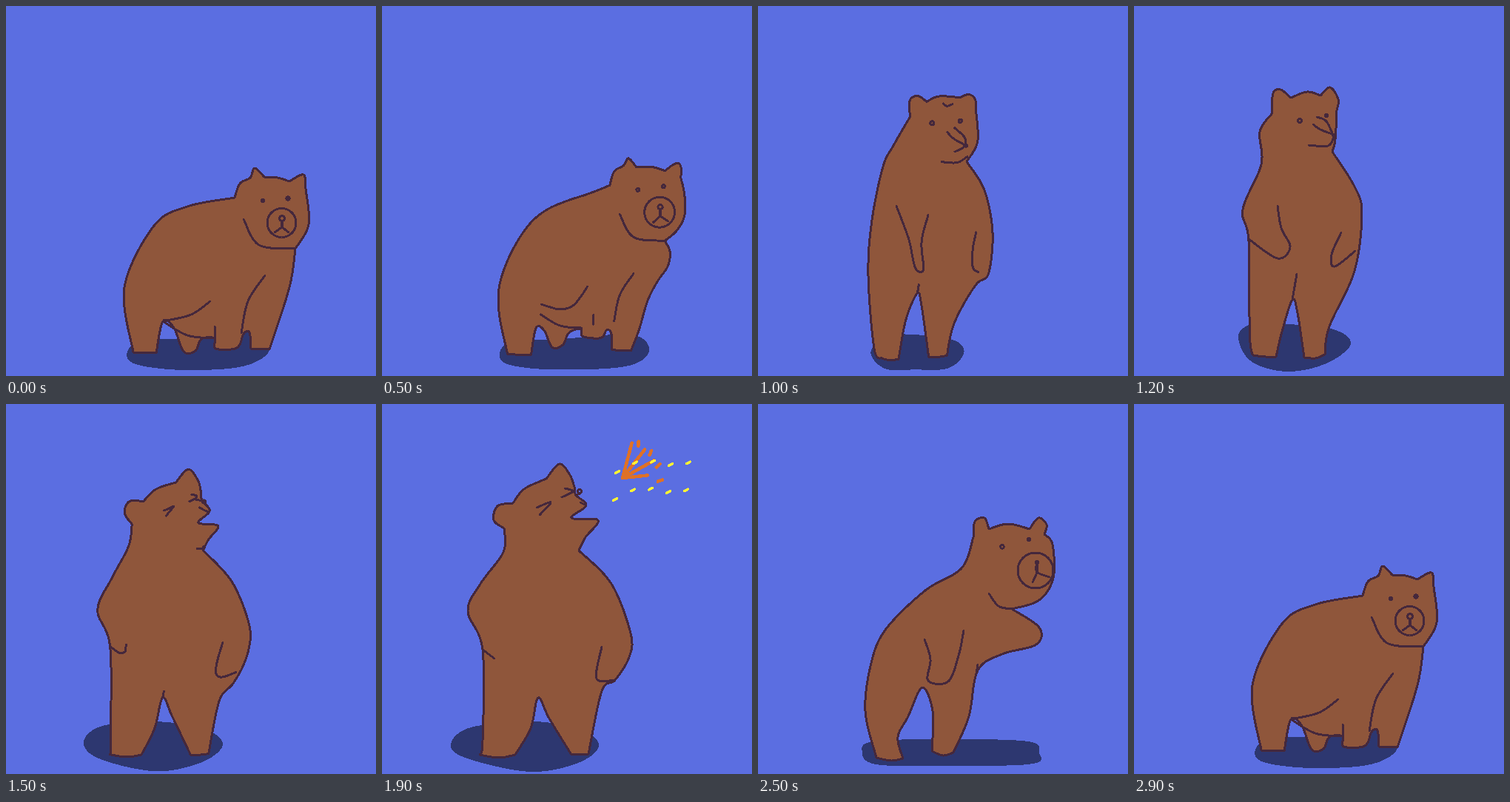
An HTML page for the animation above (3.4 s loop, 500 px wide and 500 px high).

```html
<!DOCTYPE html>
<html lang="en">
<head>
<meta charset="utf-8">
<title>Bear</title>
<style>
  html, body { margin: 0; width: 100%; height: 100%; overflow: hidden; background: #5b6ee1; }
  svg { display: block; width: 100%; height: 100%; shape-rendering: crispEdges; }
  path { stroke-linecap: round; stroke-linejoin: round; fill: none; }
  #shadow { fill: #2d3770; }
  #body { fill: #8f563b; }
  #body, #ink { stroke: #45283c; stroke-width: 3; }
  #fire { stroke: #df7126; stroke-width: 4.5; }
  #sparks { stroke: #fbf236; stroke-width: 3.5; }
</style>
</head>
<body>
<svg viewBox="0 0 500 500">
  <path id="shadow"/>
  <g id="bear"><path id="body"/><path id="ink"/></g>
  <path id="fire"/>
  <path id="sparks"/>
</svg>
<script>
const LOOP = 3400, STEP = 100, SAMPLES = 60;
const el = id => document.getElementById(id);
const mix = (a, b, u) => a + (b - a) * u;
const blend = (a, b, u) => a.map((p, i) => [mix(p[0], b[i][0], u), mix(p[1], b[i][1], u)]);
const draw = (pts, end = '') => 'M' + pts.map(p => p.join()).join('L') + end;
const samples = fn => Array.from({ length: SAMPLES + 1 }, (_, i) => fn(i / SAMPLES));
const polar = (x, y, r, angle) => [x + r * Math.cos(angle), y + r * Math.sin(angle)];
const ring = (x, y, r) => samples(u => polar(x, y, r, u * 2 * Math.PI));

// Catmull-Rom spline through a few key points
function curve(text, closed = false) {
  const keys = text.split(' ').map(p => p.split(',').map(Number));
  const n = keys.length, spans = closed ? n : n - 1;
  const key = i => keys[closed ? (i + n) % n : Math.min(Math.max(i, 0), n - 1)];
  return samples(u => {
    const i = Math.max(0, Math.min(Math.floor(u * spans), spans - 1)), t = u * spans - i;
    return [0, 1].map(axis => {
      const [a, b, c, d] = [-1, 0, 1, 2].map(k => key(i + k)[axis]);
      return b + t / 2 * (c - a + t * (2 * a - 5 * b + 4 * c - d + t * (3 * (b - c) + d - a)));
    });
  });
}

// Body sections: back | ear | crown | ear | face | front | foot | legs | foot
function outline(text) {
  const parts = text.split('|');
  return parts.map((part, i) => curve(part + ' ' + parts[(i + 1) % parts.length].split(' ')[0]));
}

// Ink: chin, two arms, belly, detail, two eyes, snout, nose, mouth
const poses = {
  crouch: {
    shadow: curve('164,467 185,452 240,449 330,441 356,465 320,487 240,492 175,484', true),
    body: outline('172,468 160,380 200,297 245,271|309,259 316,240 330,232 336,219|349,231 367,232|383,237 402,228|405,247 409,295|391,328 383,380|356,464|331,463 329,441 321,443 312,462 283,463 282,449 264,450 256,466 240,467 227,435 212,426|203,469'),
    ink: [
      curve('321,288 342,323 391,328'), curve('212,426 250,417 276,399'),
      curve('350,364 327,399 318,442'), curve('212,426 245,445 282,449'), curve('282,433 282,449'),
      ring(347, 263, 2), ring(381, 260, 2.2), ring(372.5, 293, 19.5), ring(373, 287, 3.5),
      curve('363,306 373,298 373,291 373,298 382,306')
    ]
  },
  lean: {
    shadow: curve('141,472 155,456 260,453 365,456 380,471 365,487 210,489 155,486', true),
    body: outline('160,478 145,415 153,350 173,304 226,252 275,222|291,180 293,159 306,154|312,169 338,162|367,169 379,154 390,163|387,176 398,190 399,235 380,265|343,277 380,302 376,325 330,338 297,360 285,422|264,471 250,475|235,469 236,415 222,383 203,422 189,450|196,479 180,482'),
    ink: [
      curve('312,256 325,273 343,277'), curve('225,318 233,345 230,374 257,375 271,340 278,306'),
      curve('297,352 295,365'), curve('222,383'), curve('297,360'),
      ring(330, 193, 2.3), ring(366, 183, 1.6), ring(375, 225, 24), ring(377, 214, 1.5),
      curve('371,241 377,227 377,215 377,227 394,234')
    ]
  },
  upright: {
    shadow: curve('158,479 180,456 210,451 262,459 271,475 255,493 215,490 178,495', true),
    body: outline('168,478 157,467 146,388 157,300 167,220 190,197|215,152 214,132 225,126|236,132 250,125|283,125 301,126|305,143 309,185|289,217 312,255 322,325 315,382 297,374 266,425|254,473|231,474 221,400 216,384 200,415|189,479 178,481'),
    ink: [
      curve('254,222 272,223 289,217'), curve('203,248 211,300 216,365 232,374 233,330 248,289'),
      curve('302,306 301,340 297,374'), curve('216,384'), curve('283,125 290,130 301,126'),
      ring(241, 160, 2.6), ring(280, 159, 2.4), curve('275,172 291,190 286,203 264,207'),
      ring(287, 196, 2), curve('263,176 270,185 283,194')
    ]
  },
  stand: {
    shadow: curve('141,445 165,428 210,430 270,437 293,457 260,483 207,494 158,480', true),
    body: outline('167,473 157,455 155,318 147,275 172,214 170,170|186,146 188,118 198,113|212,124 234,116|252,121 265,110 276,126|274,141 272,180|268,197 298,244 308,280 298,358 264,433|258,471 245,476|230,475 221,415 214,397 200,440|192,474 178,474'),
    ink: [
      curve('236,188 262,189 270,177'), curve('155,315 194,341 211,326 199,300 194,270'),
      curve('280,306 267,336 271,352 299,331'), curve('214,397 220,362'), curve('186,146'),
      ring(224, 155, 2.4), ring(260, 148, 2), curve('247,150 260,156 270,177'),
      ring(269, 174, 1), curve('242,160 252,167 268,173')
    ]
  },
  roar: {
    shadow: curve('93,460 120,437 205,429 270,441 293,462 265,485 200,497 115,479', true),
    body: outline('132,474 136,455 136,332 116,280 133,243 164,200|165,168 151,157 156,138|177,134 192,115|222,101 240,81 254,96|260,112 262,123 276,137 256,154 292,157 275,180|266,198 310,243 336,310 334,342 315,373 297,388|279,473|256,474 226,425 211,397 201,438|180,474 158,478'),
    ink: [
      curve('266,198'), curve('136,332 152,344'), curve('297,328 290,371 315,373'),
      curve('211,397'), curve('165,168'), curve('209,140 228,133 213,150'),
      curve('243,126 258,118 247,114'), curve('261,123 268,121'), ring(267, 118, 2.5),
      curve('268,133 276,137')
    ]
  }
};
const track = [
  [0, 'crouch'], [420, 'crouch'], [800, 'lean'], [900, 'upright'], [1200, 'stand'],
  [1600, 'roar'], [1900, 'roar'], [2200, 'stand'], [2300, 'upright'], [2500, 'lean'],
  [2880, 'crouch'], [LOOP, 'crouch']
];
const BURST = 1600, BURST_STEPS = 8;

function drawBear(time) {
  const next = track.findIndex(([t]) => time < t);
  const [t0, from] = track[next - 1], [t1, to] = track[next];
  const u = (time - t0) / (t1 - t0), a = poses[from], b = poses[to];
  const lines = part => a[part].map((line, i) => blend(line, b[part][i], u));
  el('shadow').setAttribute('d', draw(blend(a.shadow, b.shadow, u), 'Z'));
  el('body').setAttribute('d', draw(lines('body').flat(), 'Z'));
  el('ink').setAttribute('d', lines('ink').map(line => draw(line)).join(''));

  // Lunge forward while rising, recoil when the burst begins
  const share = name => (from === name ? 1 - u : 0) + (to === name ? u : 0);
  const sway = 1.5 * share('crouch') * share('lean') ** 3;
  const recoil = time < BURST ? 0 : .024 * Math.max(0, 1 - (time - BURST) / 200);
  el('bear').setAttribute('transform',
    `matrix(1 0 ${-sway} ${1 + recoil} ${470 * sway} ${-470 * recoil})`);
}

function drawBurst(time) {
  const n = (time - BURST) / STEP;
  let fire = '', sparks = '';
  if (n >= 0 && n < BURST_STEPS) {
    const spread = ((n + 1) / 4) ** .53;
    const fall = Math.max(0, (n - 3) / 4) ** 2;
    for (let i = 0; i < 4 && n < 5; i++) {
      const angle = (23 * i - 75) * Math.PI / 180;
      const at = (r, turn = 0) => polar(325, 100, r * spread, angle + turn);
      if (n < 4) fire += draw([at(0), at(i < 3 ? 49 : 34)]);
      fire += draw([at(48, .2), at(54, .15)]);
    }
    // Pairs of embers fan out, then sink to one level and burn out
    for (let i = Math.max(0, 2 * (n - 3)); i < 10; i++) {
      const pair = i >> 1, low = i & 1;
      const x = 318 + (24 * pair - 3 * low) * spread;
      const y = mix(105 + ((low ? 24 : -13) - 5 * pair + 8 * Math.sin(5 * pair)) * spread, 158, fall);
      const half = n < BURST_STEPS - 1 ? 2.5 : .4;
      sparks += draw([[x - half, y + half / 2], [x + half, y - half / 2]]);
    }
  }
  el('fire').setAttribute('d', fire);
  el('sparks').setAttribute('d', sparks);
}

const start = performance.now();
let shown = -1;
function tick(now) {
  const time = Math.floor(Math.max(0, now - start) % LOOP / STEP) * STEP;
  if (time !== shown) {
    drawBear(time);
    drawBurst(time);
    shown = time;
  }
  requestAnimationFrame(tick);
}
tick(start);
</script>
</body>
</html>
```
